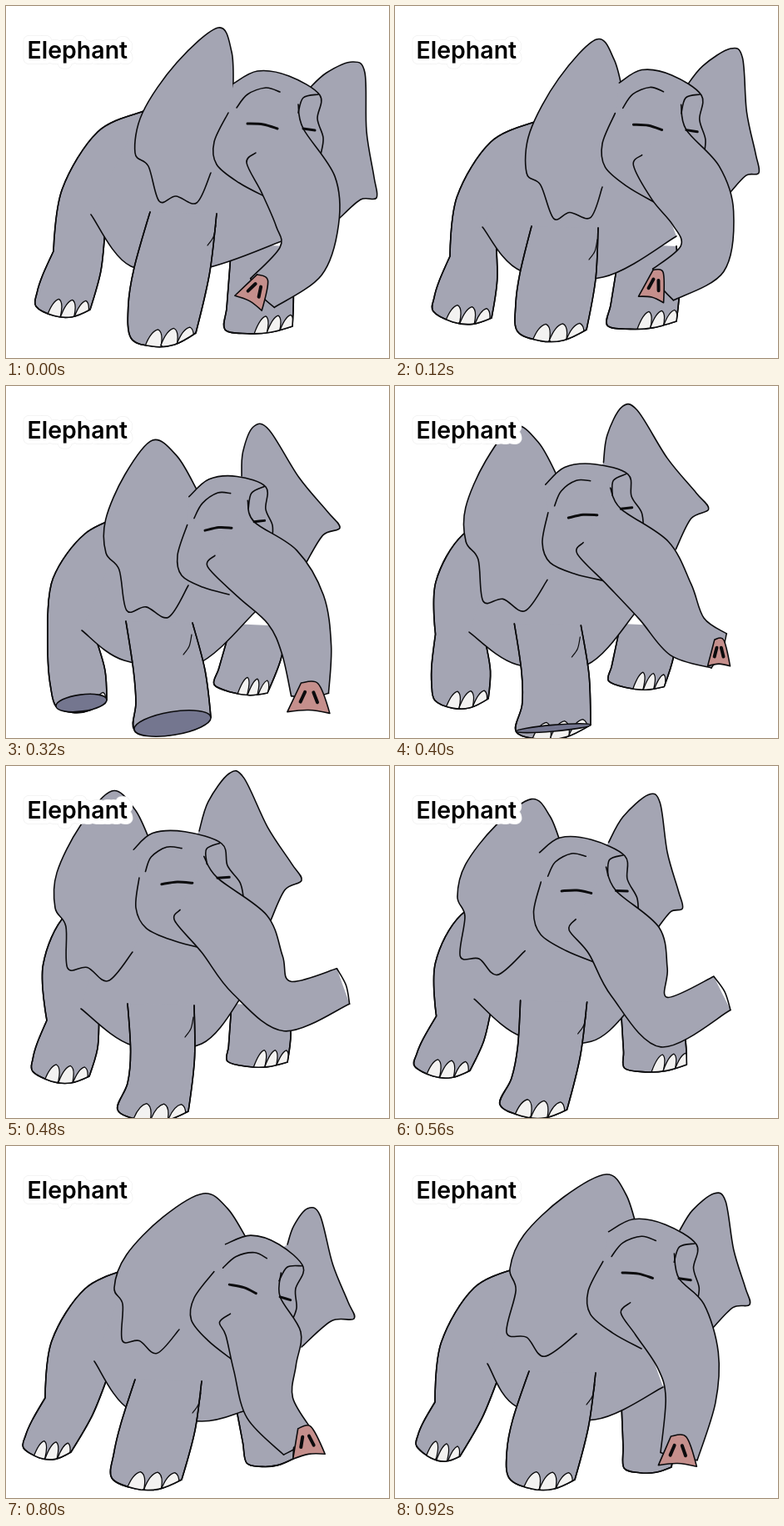
An HTML page with a canvas for the animation above (960 ms loop, 460 px wide and 422 px high).

```html
<!DOCTYPE html>
<html lang="en">
<head>
<meta charset="utf-8">
<title>Elephant</title>
<style>
html, body { margin: 0; width: 100%; height: 100%; overflow: hidden; background: #fff; }
canvas { display: block; }
</style>
</head>
<body>
<canvas id="stage" width="460" height="422"></canvas>
<script>
const ctx = document.getElementById('stage').getContext('2d');
const GREY = '#a4a5b3', INK = '#0b0b0d', TOE = '#f3f2f1', SOLE = '#74768f', PINK = '#c58f8c';
const LOOP = 960;
const KEYS = [0, 120, 320, 480, 640, 800, 920];
const STEPS = [0, 40, 80, 120, 160, 200, 240, 320, 360, 400, 480, 560, 640, 720, 800, 840, 880, 920];

const numbers = text => text.match(/-?\d+/g).map(Number);
const pairs = flat => Array.from({ length: flat.length >> 1 }, (_, i) => [flat[2 * i], flat[2 * i + 1]]);
const outline = text => pairs(numbers(text));
const lerp = (a, b, t) => a.map((v, i) => v + (b[i] - v) * t);
const shift = ([x, y], dx, dy) => [x + dx, y + dy];

// Joints of the rig at each key time.
const RIG = {
  head: '250,163 314,230 377,107 | 249,165 311,235 368,107 | 206,203 268,250 312,121 | 156,170 242,220 259,93 | 188,185 248,256 306,128 | 226,182 270,255 357,145 | 232,174 296,243 362,118',
  trunk: '351,214 362,263 354,306 308,344 | 349,212 370,254 369,303 322,334 | 314,225 348,268 361,316 365,370 | 274,201 302,250 338,288 405,264 | 284,221 293,270 312,328 373,301 | 309,225 311,266 317,314 351,356 | 330,208 352,257 355,305 341,372',
  nose: '300,340 29,37 | 312,334 14,31 | 364,373 2,51 | 405,264 0,0 | 373,301 0,0 | 361,354 -9,39 | 340,365 2,46', // centre, tilt, width
  nearEar: '273,98 255,26 155,176 246,200 | 274,105 242,40 158,200 249,217 | 229,124 176,65 120,200 219,239 | 175,95 127,30 59,170 152,223 | 239,104 210,54 102,150 173,222 | 290,113 237,57 130,170 208,220 | 291,100 254,34 138,147 218,225',
  farEar: '363,100 416,67 445,230 401,254 | 348,99 403,51 437,200 403,223 | 283,108 297,49 401,170 361,211 | 232,78 268,9 355,137 318,185 | 293,110 346,66 350,208 322,211 | 338,118 362,75 418,207 355,241 | 342,101 383,57 426,190 381,219',
  back: '110,151 57,294 | 115,163 66,300 | 95,177 50,290 | 72,178 49,305 | 90,178 50,294 | 95,171 47,302 | 95,170 48,307',
  belly: '102,250 150,312 236,315 331,282 | 105,265 152,318 250,325 338,276 | 91,293 142,329 228,334 300,270 | 90,291 152,335 235,333 284,275 | 101,267 150,313 235,328 285,305 | 106,258 150,317 235,330 285,318 | 111,261 147,313 240,328 322,289',
  rearFoot: '36,360 101,364 | 46,366 116,374 | 60,384 121,376 | 32,366 100,372 | 19,357 82,360 | 21,362 78,367 | 26,360 78,372',
  frontLeg: '173,247 150,398 228,392 | 164,264 147,390 230,388 | 144,282 154,412 246,397 | 146,285 134,412 219,414 | 155,277 121,399 199,407 | 155,280 127,398 211,400 | 161,270 137,398 216,400',
  farFoot: '263,388 344,384 | 255,383 338,378 | 250,358 314,368 | 266,354 338,355 | 284,372 358,364 | 289,380 345,375 | 275,386 332,385'
};
for (const name in RIG) RIG[name] = RIG[name].split('|').map(numbers);

// Drawings at rest, carried along by the joints.
const FACE = {
  skull: outline('273,93 302,78 340,84 377,107 374,135 381,158 378,178'),
  cheek: outline('267,128 250,163 253,190 280,212 314,230'),
  bridge: outline('351,118 357,147'),
  mouth: outline('300,176 289,188'),
  leftBrow: outline('277,122 290,106 312,98 329,103'),
  rightBrow: outline('351,128 357,110 375,106'),
  leftEye: outline('290,141 309,142 326,147'),
  rightEye: outline('357,147 371,149')
};
const NEAR_EAR = outline('273,98 271,55 255,26 205,68 164,128 155,176 171,192 184,234 204,228 229,236 246,200');
const FAR_EAR = outline('363,100 385,80 416,67 431,80 433,150 442,205 445,230 426,232 401,254');

// Cyclic Hermite interpolation between the key times.
function poseAt(time) {
  const n = KEYS.length;
  const keyTime = k => KEYS[(k + n) % n] + LOOP * Math.floor(k / n);
  const k = KEYS.filter(t => t <= time).length - 1;
  const near = [k - 1, k, k + 1, k + 2];
  const [t0, t1, t2, t3] = near.map(keyTime);
  const span = t2 - t1, s = (time - t1) / span, r = 1 - s;
  const pose = {};
  for (const name in RIG) {
    const [a, b, c, d] = near.map(i => RIG[name][(i + n) % n]);
    pose[name] = pairs(b.map((v, i) => {
      const m1 = (c[i] - a[i]) / (t2 - t0) * span, m2 = (d[i] - v) / (t3 - t1) * span;
      return (1 + 2 * s) * r * r * v + s * r * r * m1 + s * s * (3 - 2 * s) * c[i] - s * s * r * m2;
    }));
  }
  return pose;
}

// Affine map that takes three rest joints to three posed ones.
function affine([a, b, c], [A, B, C]) {
  const ux = b[0] - a[0], uy = b[1] - a[1], vx = c[0] - a[0], vy = c[1] - a[1];
  const det = ux * vy - uy * vx;
  return ([x, y]) => {
    const dx = x - a[0], dy = y - a[1];
    const u = (dx * vy - dy * vx) / det, v = (ux * dy - uy * dx) / det;
    return [0, 1].map(i => A[i] + u * (B[i] - A[i]) + v * (C[i] - A[i]));
  };
}

// Each stretch between two joints turns and scales with them.
function follow(rest, joints, posed) {
  return rest.map((p, i) => {
    const k = Math.max(1, joints.findIndex(j => j >= i));
    const a = rest[joints[k - 1]], b = rest[joints[k]], A = posed[k - 1], B = posed[k];
    const ux = b[0] - a[0], uy = b[1] - a[1], dx = p[0] - a[0], dy = p[1] - a[1];
    const len = ux * ux + uy * uy, t = (dx * ux + dy * uy) / len, s = (dy * ux - dx * uy) / len;
    const X = B[0] - A[0], Y = B[1] - A[1];
    return [A[0] + t * X - s * Y, A[1] + t * Y + s * X];
  });
}

// Smooth curve through the points; corners get no tangent.
function trace(pts, corners = []) {
  const tangent = i => {
    if (corners.includes(i)) return [0, 0];
    const p = pts[Math.max(i - 1, 0)], q = pts[Math.min(i + 1, pts.length - 1)];
    return [(q[0] - p[0]) / 6, (q[1] - p[1]) / 6];
  };
  ctx.lineTo(...pts[0]);
  for (let i = 1; i < pts.length; i++) {
    const [x0, y0] = pts[i - 1], [x1, y1] = pts[i];
    const [u0, v0] = tangent(i - 1), [u1, v1] = tangent(i);
    ctx.bezierCurveTo(x0 + u0, y0 + v0, x1 - u1, y1 - v1, x1, y1);
  }
}

function fill(color) {
  ctx.fillStyle = color;
  ctx.fill();
}

function line(pts, width = 1.6, corners) {
  ctx.lineWidth = width;
  ctx.beginPath();
  trace(pts, corners);
  ctx.stroke();
}

// The fill closes through the root points, which stay without ink.
function shape(pts, { corners, color = GREY, roots = [] } = {}) {
  ctx.beginPath();
  trace(pts, corners);
  roots.forEach(p => ctx.lineTo(...p));
  fill(color);
  line(pts, 1.6, corners);
}

function band(a, b) {
  ctx.beginPath();
  trace(a);
  trace([...b].reverse());
  fill(GREY);
  line(a);
  line(b);
}

function leg({ hips: [hipL, hipR], foot: [left, right], bend = 0, sag, toes: [first, last], sole, above = [] }) {
  const under = t => shift(lerp(left, right, t), 0, sag);
  const pts = [...above, hipL,
    shift(lerp(hipL, left, 0.45), bend, 0), shift(lerp(hipL, left, 0.75), bend, 0), left,
    under(0.33), under(0.67), right, shift(lerp(right, hipR, 0.5), 4, 0), hipR];
  const corners = [above.length, pts.length - 3];
  shape(pts, { corners });

  ctx.save();
  ctx.beginPath();
  trace(pts, corners);
  ctx.clip();
  const half = (right[0] - left[0]) * (last - first) / 4;
  for (const t of last ? [first, (first + last) / 2, last] : []) {
    const [x, y] = under(t), tipX = x + 6, tipY = y - 20;
    ctx.beginPath();
    ctx.moveTo(x - half, y);
    ctx.quadraticCurveTo(tipX - half * 0.9, tipY + 2, tipX, tipY);
    ctx.quadraticCurveTo(tipX + half * 0.7, tipY + 3, x + half, y);
    ctx.lineTo(x, y + 10);
    ctx.closePath();
    fill(TOE);
    ctx.lineWidth = 1.3;
    ctx.stroke();
  }
  ctx.restore();
  line(pts, 1.6, corners);

  if (sole > 3) {
    const [cx, cy] = lerp(left, right, 0.5), dx = right[0] - left[0], dy = right[1] - left[1];
    ctx.beginPath();
    ctx.ellipse(cx, cy, Math.hypot(dx, dy) / 2, sole, Math.atan2(dy, dx), 0, 7);
    fill(SOLE);
    ctx.stroke();
  }
}

// Tapering tube around the spine, grown out of the face.
function trunk(spine, bridge, mouth) {
  const edge = side => spine.map(([x, y], i) => {
    const p = spine[Math.max(i - 1, 0)], q = spine[Math.min(i + 1, spine.length - 1)];
    const tx = q[0] - p[0], ty = q[1] - p[1];
    const k = side * (45 - 7.5 * i) / Math.hypot(tx, ty);
    return [x + ty * k, y - tx * k];
  });
  const right = [...bridge, ...edge(1)], left = [...mouth, ...edge(-1)];
  band(right, left);
  const a = right[right.length - 1], b = left[left.length - 1], [x, y] = lerp(a, b, 0.5);
  line([a, [x + (a[1] - b[1]) * -0.08, y + (a[0] - b[0]) * 0.08], b]);
}

function nose([[x, y], [tilt, width]]) {
  if (width < 12) return;
  const angle = tilt * Math.PI / 180, height = 37 * Math.min(1, width / 30);
  const place = ([u, v]) => [
    x + u * width * Math.cos(angle) - v * height * Math.sin(angle),
    y + u * width * Math.sin(angle) + v * height * Math.cos(angle)];
  const rim = [[-0.2, -0.45], [0.2, -0.45], [0.5, 0.5], [0, 0.42], [-0.5, 0.5], [-0.2, -0.45]];
  shape(rim.map(place), { corners: [2, 4], color: PINK });
  for (const side of [-1, 1])
    line([[side * 0.1, -0.16], [side * 0.2, 0.16]].map(place), 4);
}

function label() {
  ctx.font = '600 28.5px Inter, Roboto, sans-serif';
  for (const [color, width] of [['#f1f1f1', 14], ['#fff', 12.5]]) {
    ctx.strokeStyle = color;
    ctx.lineWidth = width;
    ctx.strokeText('Elephant', 25.5, 63);
  }
  ctx.fillStyle = '#000';
  ctx.fillText('Elephant', 25.5, 63);
}

function draw(time) {
  const p = poseAt(time);
  const lift = (peak, size) => size * Math.exp(-(((time - peak) / 70) ** 2));
  const carry = affine(pairs(RIG.head[0]), p.head);
  const face = {};
  for (const name in FACE) face[name] = FACE[name].map(carry);
  const eye = face.leftEye[0];

  ctx.fillStyle = '#fff';
  ctx.fillRect(0, 0, 460, 422);
  ctx.strokeStyle = INK;
  ctx.lineCap = ctx.lineJoin = 'round';

  shape(follow(FAR_EAR, [0, 2, 6, 8], p.farEar), { roots: [eye] });
  leg({
    hips: [[271, 285], [338, 288]], foot: p.farFoot, sag: 6,
    toes: time < 700 ? [0.53, 0.9] : [], sole: lift(640, 8)
  });

  const [back, hip] = p.back;
  const neck = shift(back, 55, -25);
  leg({
    hips: [hip, lerp(p.belly[0], p.belly[1], 0.35)], foot: p.rearFoot, bend: -4, sag: 10,
    toes: [0.33, 0.83], sole: lift(320, 10),
    above: [neck, back, shift(lerp(back, hip, 0.5), -16, -3)]
  });
  shape(p.belly, { roots: [eye, neck] });

  const [shoulder, ...frontFoot] = p.frontLeg;
  const elbow = shift(shoulder, 80, 2);
  leg({
    hips: [shoulder, elbow], foot: frontFoot, sag: 12,
    bend: -9 * Math.cos(2 * Math.PI * time / LOOP),
    toes: [0.34, 0.83], sole: lift(320, 14)
  });
  line([shift(elbow, -1, 14), shift(elbow, -4, 28), shift(elbow, -11, 38)], 1.2);

  shape(follow(NEAR_EAR, [0, 2, 5, 10], p.nearEar), { roots: [eye] });
  band(face.skull, face.cheek);
  trunk(p.trunk, face.bridge, face.mouth);
  line(face.leftBrow);
  line(face.rightBrow);
  line(face.leftEye, 3);
  line(face.rightEye, 3);
  nose(p.nose);
  label();
}

function tick() {
  const now = performance.now() % LOOP;
  draw(STEPS.filter(t => t <= now).pop());
  requestAnimationFrame(tick);
}
tick();
</script>
</body>
</html>
```
